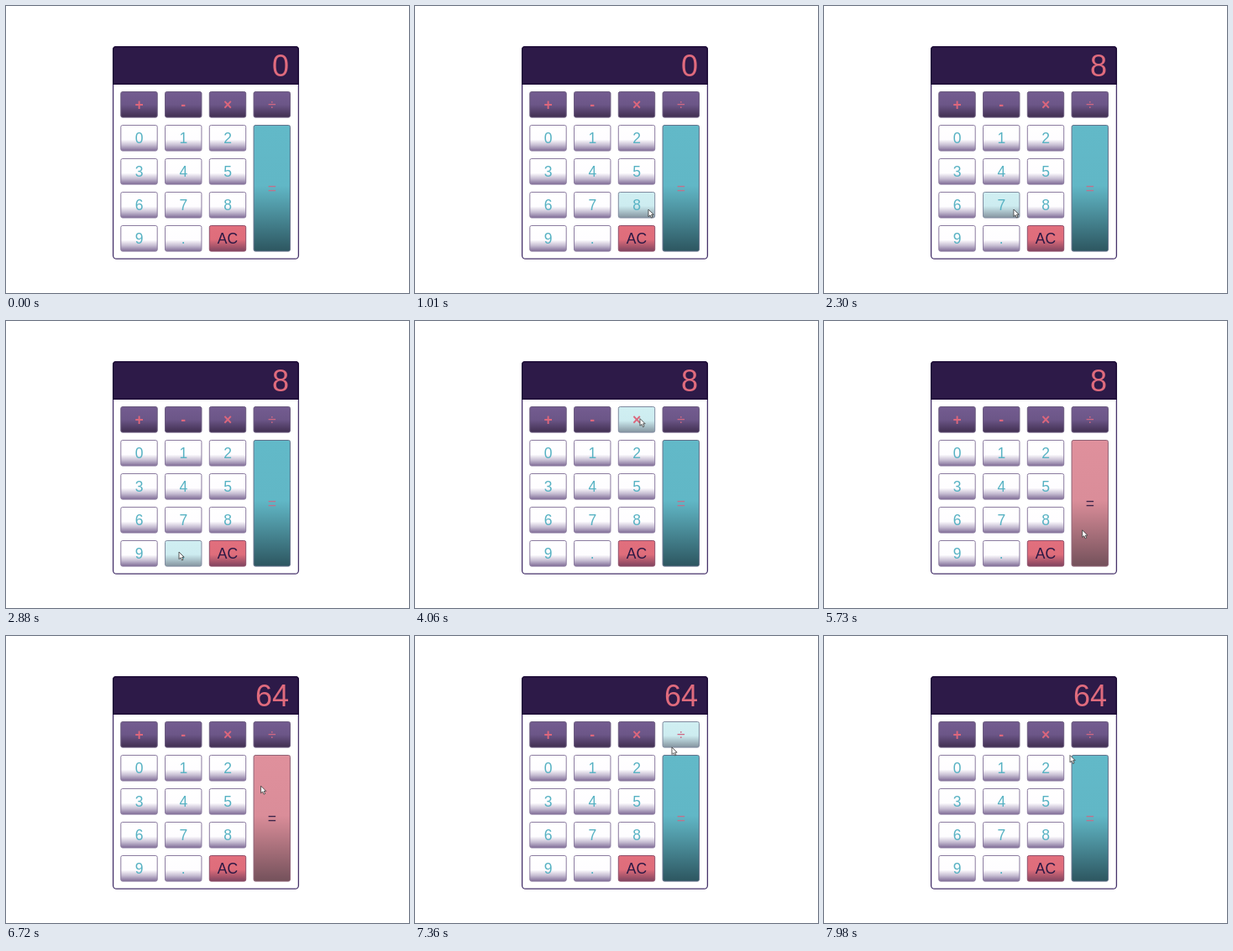
Write an HTML page that moves like this. It is 480 px wide and 343 px high and loops after 8000 ms.

```html
<!DOCTYPE html>
<html lang="en">
<head>
<meta charset="utf-8">
<title>Calculator</title>
<style>
  html, body { margin: 0; width: 100%; height: 100%; overflow: hidden; background: #fff; }
  svg { display: block; width: 480px; height: 343px; }
  text { font-family: "Liberation Sans", Arial, sans-serif; font-size: 17.5px; text-anchor: middle; }
  .key rect { stroke-width: 1; }
  .num rect { fill: url(#num); stroke: #8a7a9f; }
  .num text { fill: #57b2c3; }
  .op rect { fill: url(#op); stroke: #6a5a7e; }
  .op text { fill: #dc667c; font-weight: bold; }
  .op.thin text { fill: #cf6883; font-weight: normal; }
  .ac rect { fill: url(#ac); stroke: #8d4d68; }
  .ac text { fill: #2b1844; }
  .eq rect { fill: url(#eq); stroke: #64718a; }
  .eq text { fill: #c0718b; }
  .num.hot rect, .op.hot rect, .ac.hot rect { fill: url(#hot); stroke: #7f8a9f; }
  .eq.hot rect { fill: url(#eqHot); stroke: #8f6376; }
  .eq.hot text { fill: #3a2348; }
  #screen { fill: #df6b7d; font-size: 36px; text-anchor: end; }
</style>
</head>
<body>
<svg viewBox="0 0 480 343">
  <defs>
    <linearGradient id="num" x2="0" y2="1">
      <stop offset="0" stop-color="#fff"/><stop offset=".56" stop-color="#fefdff"/>
      <stop offset=".78" stop-color="#c6bdd2"/><stop offset="1" stop-color="#7f6c96"/>
    </linearGradient>
    <linearGradient id="hot" x2="0" y2="1">
      <stop offset="0" stop-color="#d0eff2"/><stop offset=".54" stop-color="#cdecf0"/>
      <stop offset="1" stop-color="#84949f"/>
    </linearGradient>
    <linearGradient id="op" x2="0" y2="1">
      <stop offset="0" stop-color="#735c90"/><stop offset=".5" stop-color="#6c5688"/>
      <stop offset="1" stop-color="#402f50"/>
    </linearGradient>
    <linearGradient id="ac" x2="0" y2="1">
      <stop offset="0" stop-color="#e16f7d"/><stop offset=".54" stop-color="#df6d7b"/>
      <stop offset="1" stop-color="#80445f"/>
    </linearGradient>
    <linearGradient id="eq" x2="0" y2="1">
      <stop offset="0" stop-color="#62b9c8"/><stop offset=".48" stop-color="#61b7c6"/>
      <stop offset="1" stop-color="#2d5660"/>
    </linearGradient>
    <linearGradient id="eqHot" x2="0" y2="1">
      <stop offset="0" stop-color="#df909c"/><stop offset=".48" stop-color="#da8d99"/>
      <stop offset="1" stop-color="#74515b"/>
    </linearGradient>
  </defs>
  <rect x="127.6" y="48.6" width="220.8" height="253.6" rx="4" fill="#fff" stroke="#45316a" stroke-width="1.3"/>
  <path d="M127 94V52q0-4 4-4h214q4 0 4 4v42z" fill="#1d0b36"/>
  <path d="M128.5 92.5V52q0-2.5 2.5-2.5h214q2.5 0 2.5 2.5v40.5z" fill="#2d1a48"/>
  <text id="screen" x="337" y="84">0</text>
  <g id="keys"></g>
  <path id="cursor" d="M0 0V8.6L2 6.8L3.5 10L5 9.3L3.6 6.2H6.2Z" fill="#fff" stroke="#333" stroke-width=".8" stroke-linejoin="round"/>
</svg>
<script>
const NS = 'http://www.w3.org/2000/svg';
const LOOP = 8000;
const screenText = document.getElementById('screen');
const cursor = document.getElementById('cursor');
const board = document.getElementById('keys');
const keys = [];

function make(tag, attrs, parent) {
  const el = document.createElementNS(NS, tag);
  for (const name in attrs) el.setAttribute(name, attrs[name]);
  return parent.appendChild(el);
}

function addKey(label, col, row, kind, rows = 1) {
  const x = 136.8 + col * 52.75, y = 102.5 + row * 40;
  const w = 43.4, h = 30.6 + (rows - 1) * 40;
  const el = make('g', { class: 'key ' + kind }, board);
  make('rect', { x, y, width: w, height: h, rx: 2 }, el);
  make('text', { x: x + w / 2, y: y + h / 2 + 6 }, el).textContent = label;
  keys.push({ el, x, y, w, h });
}

[...'+-×÷'].forEach((s, i) => addKey(s, i, 0, s === '÷' ? 'op thin' : 'op'));
[...'0123456789.'].forEach((s, i) => addKey(s, i % 3, 1 + Math.floor(i / 3), 'num'));
addKey('AC', 2, 4, 'ac');
addKey('=', 3, 1, 'eq', 4);

// Each hand movement: when it runs, where it ends, optional bend point
const entry = [407, 337];
const moves = [
  { from: 530, to: 1050, end: [278, 243], bend: [278, 326] },
  { from: 1230, to: 1250, end: [262, 231] },
  { from: 1750, to: 1770, end: [259, 228] },
  { from: 2150, to: 2300, end: [226, 243] },
  { from: 2300, to: 2880, end: [206, 276], bend: [160, 250] },
  { from: 2980, to: 3600, end: [268, 116.5] },
  { from: 4060, to: 4540, end: [247, 236] },
  { from: 4810, to: 4920, end: [256, 240] },
  { from: 5380, to: 5790, end: [308, 250] },
  { from: 6490, to: 6880, end: [303, 169.5] },
  { from: 7110, to: 7660, end: [307, 120] },
  { from: 7790, to: 7980, end: [293, 142.5] }
];

const clamp = v => Math.min(1, Math.max(0, v));
const ease = u => 1 - (1 - u ** 1.3) ** 3;

function pointer(t) {
  let pos = entry;
  for (const { from, to, end, bend } of moves) {
    if (t < from) break;
    const k = ease(clamp((t - from) / (to - from)));
    pos = pos.map((a, i) => {
      const mid = bend ? bend[i] : (a + end[i]) / 2;
      return (1 - k) ** 2 * a + 2 * k * (1 - k) * mid + k * k * end[i];
    });
  }
  return pos;
}

function draw(t) {
  const shown = t >= moves[0].from;
  const [px, py] = pointer(t);
  screenText.textContent = t < 1930 ? '0' : t < 6050 ? '8' : '64';
  cursor.setAttribute('visibility', shown ? 'visible' : 'hidden');
  cursor.setAttribute('transform', `translate(${px} ${py})`);
  for (const { el, x, y, w, h } of keys) {
    const hot = shown && px >= x && px <= x + w && py >= y && py <= y + h;
    el.classList.toggle('hot', hot);
  }
}

const start = performance.now();
function frame() {
  draw((performance.now() - start) % LOOP);
  requestAnimationFrame(frame);
}
frame();
</script>
</body>
</html>
```
